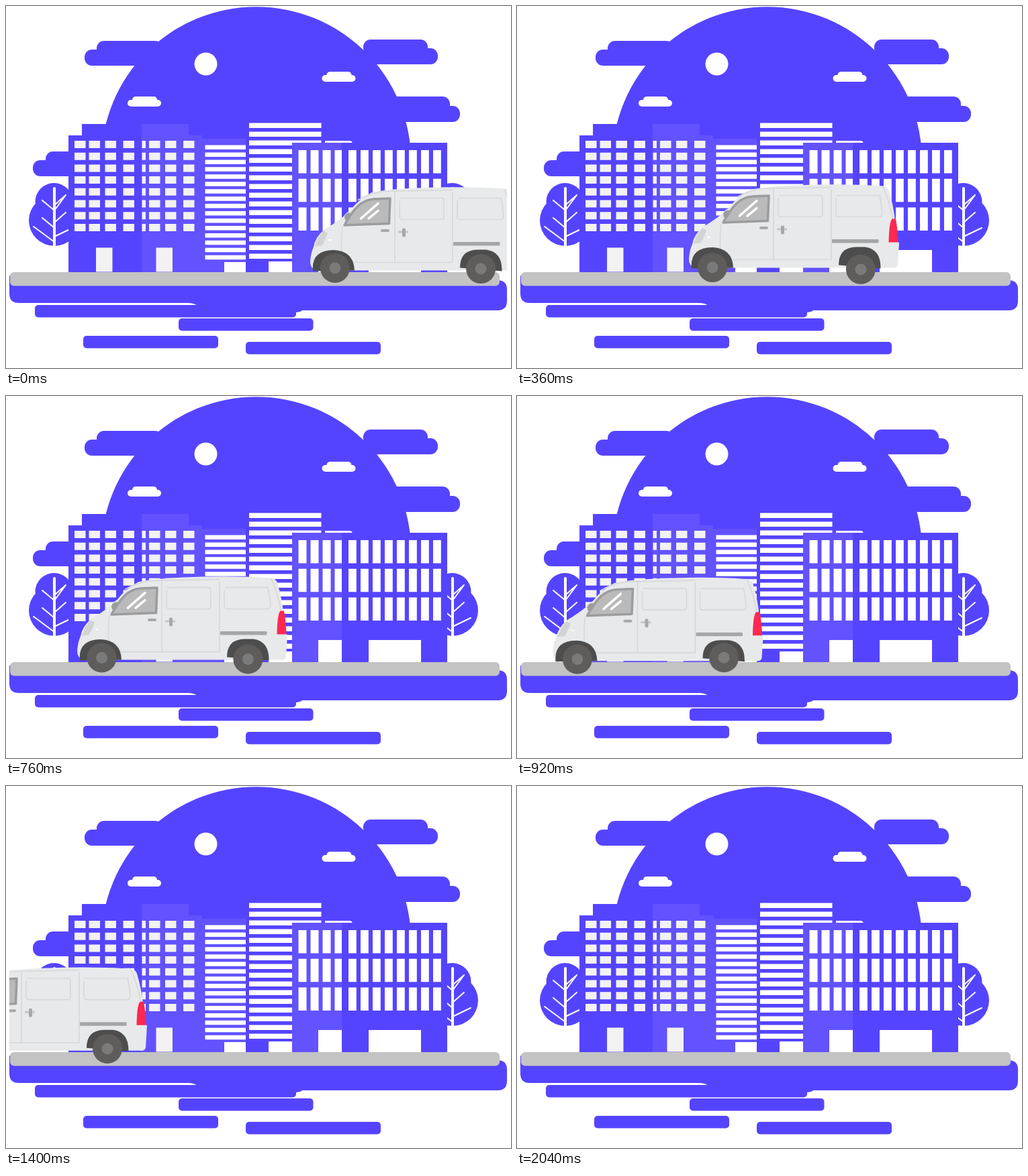
These frames come from a looping animation (752 by 540 pixels, 2600 ms). An HTML page:

```html
<!DOCTYPE html>
<html lang="en">
<head>
<meta charset="utf-8">
<title>Delivery van</title>
<style>
html, body { margin: 0; width: 100%; height: 100%; overflow: hidden; background: #fff; }
svg { display: block; }
.line { fill: none; stroke: #fff; stroke-linecap: round; }
.seam { fill: none; stroke: #d6d8d9; stroke-width: 1.6; }
</style>
</head>
<body>
<svg width="752" height="540" viewBox="0 0 752 540">
  <defs>
    <clipPath id="stage"><path d="M5 0H746V540H5z"/></clipPath>
    <g id="tree">
      <circle cx="71.500" cy="292" r="28"/>
      <circle cx="72" cy="320" r="38"/>
      <path class="line" stroke-width="4" d="M72 272V358"/>
      <path class="line" stroke-width="2" d="M54 290L72 305L89 282M72 297L89 282M54 316L72 331M72 323L89 308M41 329L72 352M72 344L99 331" style="stroke-linejoin:round" id="twigs"/>
    </g>
    <g id="puff">
      <rect x="181" y="140" width="50" height="10" rx="5"/>
      <rect x="188" y="135" width="37" height="11" rx="5"/>
    </g>
    <g id="wheel"><circle r="22" fill="#5f5d5c"/><circle r="8.500" fill="#7b7a7a"/></g>
  </defs>

  <g fill="#5544ff">
    <circle cx="372.500" cy="232" r="230.700"/>
    <g id="clouds"></g>
    <use href="#tree"/>
    <use href="#tree" x="593"/>
    <path d="M93 193H113V176H272V193H292V397H93zM357 174H470V397H357z"/>
  </g>
  <g fill="#fff">
    <circle cx="297.500" cy="86.500" r="17"/>
    <use href="#puff"/>
    <use href="#puff" x="289.500" y="-37"/>
    <path d="M475 206V201H511Q516 201 516 206z"/>
  </g>
  <path fill="#6252ff" d="M202 176H272V193H292V198H357V397H202z"/>
  <path id="left" fill="#f2f2f2"/>
  <path id="mid" fill="#fff"/>
  <path fill="#5544ff" d="M426 204H657V397H426z"/>
  <path fill="#6252ff" d="M426 204H500V397H426z"/>
  <path id="right" fill="#fff"/>

  <path fill="#5544ff" d="M5 402V429Q5 443 19 443H270Q280 443 285 447H425V457H432Q440 456 441 454H732Q746 454 746 440V423Q746 409 732 409H20z"/>
  <g fill="#5544ff" id="strips"></g>
  <rect x="6" y="397" width="729" height="20.500" rx="6" fill="#c3c3c3"/>

  <g clip-path="url(#stage)"><g id="van">
    <g id="shell">
      <path fill="#e7e9ea" d="M191 382Q192 368 196 360Q198 346 212 334Q226 326 241 314Q244 309 250 306Q264 288 282 279Q300 274 350 272Q420 269 480 273Q487 274 489 280Q496 304 498 325L502 356L504 358L502 390Q501 396 494 395H200Q191 392 191 382z"/>
      <path fill="#d2d3d4" d="M198 359Q202 346 211 336L217 339Q214 350 208 358z"/>
      <ellipse cx="220.500" cy="349.500" rx="2.500" ry="1.200" fill="#fff"/>
      <path class="seam" d="M239 329Q236 355 239 383H403V278M317 277V384M480 274Q491 298 496 330M262 290Q279 280 300 277L403 275"/>
      <path class="seam" d="M325 287H387Q390 287 390 291V315Q390 319 386 319H328Q324 319 324 314V291M411 287H475Q478 300 479 315Q478 319 473 319H414Q410 319 410 314V291"/>
      <path fill="#bababa" stroke="#9b9c9e" stroke-width="3.500" stroke-linejoin="round" d="M242 327.500Q252 309 262 299Q273 289 286 288.500L310 287.500L308.500 325z"/>
      <path fill="#9b9c9e" d="M242 315Q244 308 251 309L249 319L243 320z"/>
      <path class="line" stroke-width="3.500" d="M266.500 317.500L292 295M278 317.500L292 306"/>
      <rect x="296" y="333.500" width="13" height="4" rx="2" fill="#a8a8a8"/>
      <path fill="#c5c6c7" d="M322 336H337V339H322z"/>
      <rect x="328" y="332" width="5" height="13" rx="2" fill="#a8a8a8"/>
      <rect x="404" y="352.500" width="69.500" height="5.500" rx="1" fill="#a6a6a6"/>
      <path fill="#ff2850" d="M488.500 357Q489 327 493.500 322H499Q502 338 502.500 357z"/>
      <path fill="#4d4d4d" d="M195 396Q192 365 226 364.500Q256 366 257 395zM414 391Q414 364.500 440 364H453Q477 367 476.500 396z"/>
    </g>
    <use href="#wheel" id="front"/>
    <use href="#wheel" id="rear"/>
  </g></g>
</svg>
<script>
const $ = id => document.getElementById(id);
const box = (x, y, w, h) => `M${x} ${y}h${w}v${h}h${-w}z`;
const pill = (x, y, w, h, r) => `<rect x="${x}" y="${y}" width="${w}" height="${h}" rx="${r}"/>`;
const range = n => [...Array(n).keys()];
const grid = (xs, w, y, step, rows, h) =>
  range(rows).map(r => xs.map(x => box(x, y + r * step, w, h)).join('')).join('');

$('clouds').innerHTML = [
  [135, 52, 98], [117, 65, 110], [532, 50, 96], [535, 63, 108],
  [560, 135, 101], [570, 149, 106], [59, 217, 70], [40, 230, 80]
].map(([x, y, w]) => pill(x, y, w, 24, 11)).join('');

$('strips').innerHTML = [[43, 446, 389], [257, 466, 200.5], [115, 492, 201], [357, 501, 201]]
  .map(([x, y, w]) => pill(x, y, w, 18.5, 5)).join('');

$('left').setAttribute('d',
  grid([102, 123.5, 147.5, 174.5, 213, 237, 264], 16.5, 201, 17.7, 8, 11) +
  grid([202.5], 5.5, 201, 17.7, 8, 11) +
  box(134, 360.5, 24.5, 36) + box(223.5, 360.5, 24.5, 36));

$('mid').setAttribute('d',
  grid([296.5], 60.5, 207.5, 10.95, 16, 6.5) + box(325, 382, 32, 15) +
  grid([362], 107.5, 174.5, 13, 16, 7.5) + box(391, 381, 35, 16));

$('right').setAttribute('d',
  grid([435.5, 453.5, 471.5], 12, 215, 42.8, 3, 34.5) +
  grid([489.5], 10.5, 215, 42.8, 3, 34.5) +
  grid(range(8).map(i => 510 + i * 18), 11.8, 215, 42.8, 3, 34.5) +
  box(465, 364, 35, 33) + box(540, 364, 78, 33));

// Linear interpolation through [time, value] pairs
function track(keys, t) {
  const i = Math.max(1, keys.findIndex(k => k[0] >= t));
  const [t0, a] = keys[i - 1], [t1, b] = keys[i];
  return a + (b - a) * (t - t0) / (t1 - t0);
}

const drive = [[0, 262], [200, 130], [520, 0], [560, -14], [760, -85],
  [1080, -190], [1400, -294], [1680, -383], [2040, -500], [2600, -680]];
const shake = [[0, -312], [200, 228], [2600, 4174]];

const move = (id, x, y) => $(id).setAttribute('transform', `translate(${x} ${y})`);

function draw(now) {
  const t = Math.floor(now % 2600 / 40) * 40;
  const angle = track(shake, t) * Math.PI / 180;
  const dx = 1.5 * Math.cos(0.44 - angle), dy = 1.5 * Math.sin(0.44 - angle);
  move('van', track(drive, t), 0);
  move('shell', 0, 3 * Math.cos(angle) - 2.5);
  move('front', 226.5 + dx, 391.5 + dy);
  move('rear', 446.5 - dx, 391.5 - dy);
}

const start = performance.now();
function loop() {
  draw(performance.now() - start);
  requestAnimationFrame(loop);
}
loop();
</script>
</body>
</html>
```
